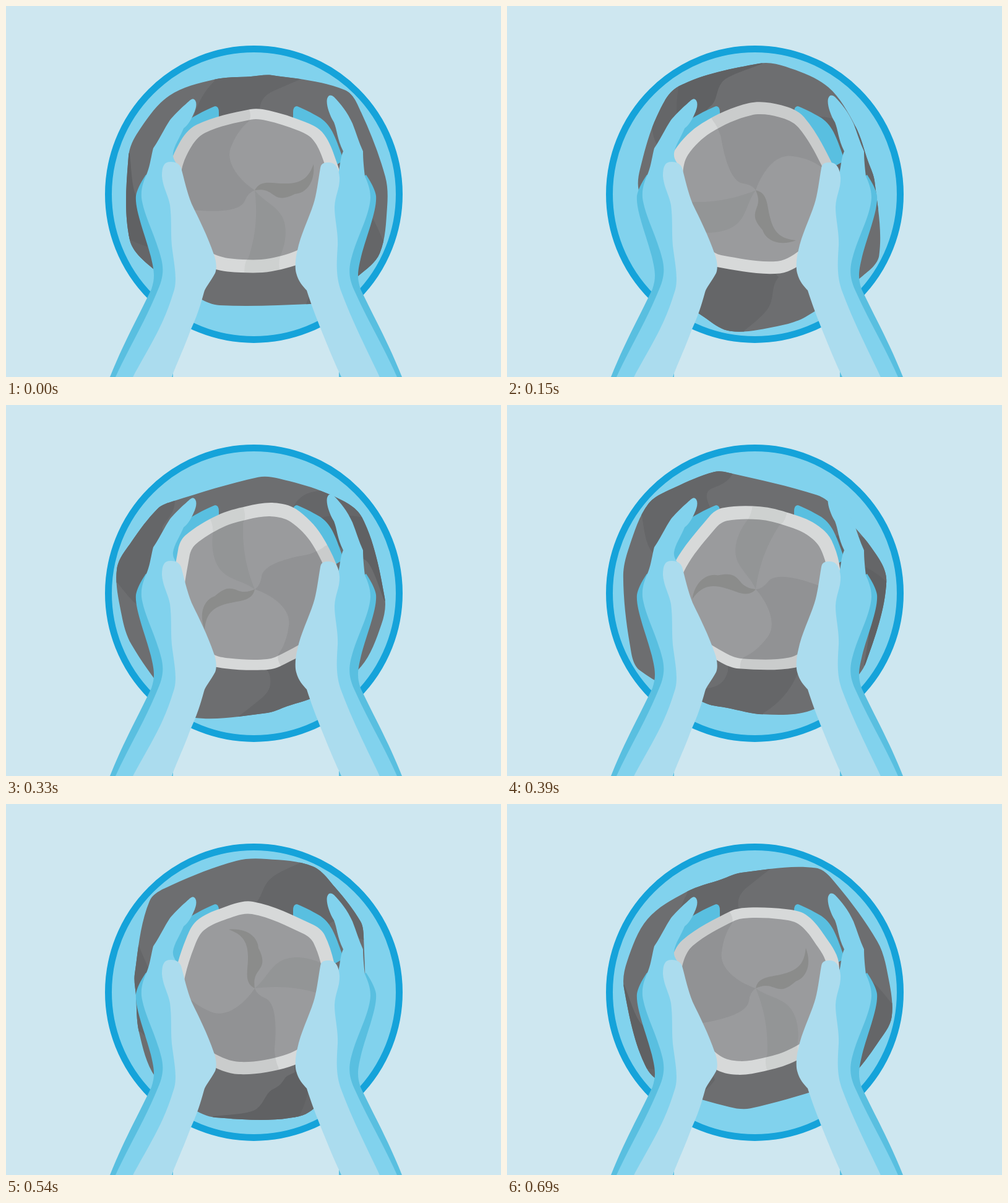
An HTML page for the animation above (720 ms loop, 800 by 600 pixels).

```html
<!DOCTYPE html>
<html lang="en">
<head>
<meta charset="utf-8">
<title>Hands shaping clay on a wheel</title>
<style>
  html, body { margin: 0; width: 100%; height: 100%; overflow: hidden; background: #cee7f0; }
  svg { display: block; width: 100%; height: 100%; }
  .dark { fill: #59bfe0; }
  .mid { fill: #81d2ed; }
  .light { fill: #abdcee; }
</style>
</head>
<body>
<svg viewBox="0 0 800 600">
  <defs>
    <path id="clay"/>
    <path id="ring"/>
    <clipPath id="clayClip"><use href="#clay"/></clipPath>
    <clipPath id="ringClip"><use href="#ring"/></clipPath>
  </defs>

  <circle cx="400.5" cy="304.5" r="235" fill="#81d2ed" stroke="#15a3da" stroke-width="11"/>

  <g id="base">
    <use href="#clay" fill="#6d6e70"/>
    <g clip-path="url(#clayClip)" fill="#656668">
      <path d="M248 436C270 440 285 440 302 424L290 370H180V440Z"/>
      <path fill="#606163" d="M200 238C203 270 204 299 212 309C222 322 235 322 243 334C252 355 262 350 267 362L280 390Q250 402 200 378H150V238Z"/>
      <path d="M609 378C595 345 588 332 575 324C562 316 550 316 540 302L470 340L501 414C510 425 520 435 516 445C510 455 490 460 485 483V520H640V390Z"/>
      <path d="M337 121C318 140 300 170 299 212H420L410 172C410 150 420 142 440 134Q460 125 480 117V90H337Z"/>
    </g>
  </g>

  <!-- far fingers and arm edges, mirrored -->
  <g id="far" class="dark">
    <path d="M168 600C190 545 210 510 235 458C241 440 240 430 234 405C225 370 208 330 210 307Q212 294 226 273L270 300V600Z"/>
    <path d="M262 250C275 215 280 195 300 181C315 172 330 165 338 162Q344 162 344 172V200L300 225L280 260Z"/>
  </g>
  <use href="#far" transform="matrix(-1 0 0 1 808 0)"/>

  <g id="bowl">
    <use href="#ring" fill="#d7d9d9"/>
    <use href="#ring" fill="#9a9b9d" transform="translate(402 296) scale(.857) translate(-402 -298)"/>
    <g clip-path="url(#ringClip)">
      <path opacity=".06" d="M402 298C375 280 352 250 365 225C372 208 382 195 392 187Q399 178 390 160H230V345L275 336Q285 331 303 330C365 336 382 325 386 315Q392 301 402 298Z"/>
      <path opacity=".045" fill="#120" d="M402 298C405 325 407 360 392 407Q383 415 386 440H445Q439 420 443 405C452 385 454 365 450 350C444 325 418 318 402 298Z"/>
    </g>
    <path fill="#8b8c8b" d="M402 298C411 280 430 287 450 287C480 288 490 275 497 256C500 285 485 303 467 304C447 314 440 311 430 304C420 296 410 297 402 298Z"/>
  </g>

  <g class="mid">
    <path d="M177 600C200 550 225 510 246 458C258 430 253 415 247 395C238 365 222 335 219 310C218 295 222 285 226 275C233 260 235 240 238 230C248 215 255 200 264 186C272 175 292 157 298 152Q303 148 306 153Q310 160 303 175C298 187 292 194 287 198C280 215 272 225 270 238Q269 246 275 254L280 300L290 470L205 600Z"/>
    <path d="M632 600C610 550 585 510 562 458C552 435 554 420 562 395C572 365 588 335 589 310C589 295 584 285 580 275C578 260 577 245 577 235C570 220 566 205 560 190C552 172 540 157 530 147Q522 141 519 150C517 158 522 175 530 188C535 200 535 215 545 235C540 245 540 260 537 270L520 300L530 470L604 600Z"/>
  </g>
  <g class="light">
    <path d="M205 600C235 545 255 515 270 465C278 445 272 420 268 388C266 365 268 345 265 322C262 305 254 295 252 275C252 260 255 252 266 252Q279 252 283 262C288 280 292 300 300 320C312 345 325 370 336 402C340 412 341 425 338 432C330 447 322 455 320 463C310 500 303 513 298 525C285 560 275 580 268 600Z"/>
    <path d="M604 600C580 550 560 510 543 465C533 440 534 420 536 388C537 365 531 345 531 325C532 305 540 295 539 277C538 262 532 252 520 253Q509 253 508 262C504 285 502 305 497 320C489 345 476 370 471 395C467 410 467 425 469 432C473 447 480 453 486 460C494 485 502 505 507 518C520 550 530 575 542 600Z"/>
  </g>
</svg>
<script>
  const STEP = 30, TURN = 15, STEPS = 24;
  const byId = id => document.getElementById(id);

  // Corners of the two lumps at rest
  const corners = {
    clay: [
      [198, 243], [214, 203], [264, 145], [336, 119], [396, 114], [430, 112],
      [548, 136], [574, 172], [613, 276], [616, 325], [604, 400], [570, 436],
      [515, 477], [490, 482], [345, 484], [313, 473], [238, 425], [200, 378]
    ],
    ring: [
      [304, 406], [275, 354], [263, 272], [280, 222], [308, 192], [395, 167],
      [425, 169], [482, 187], [511, 204], [531, 243], [542, 295], [505, 392],
      [488, 411], [430, 429], [380, 431], [336, 425]
    ]
  };

  // Closed smooth curve; handles are a third of each chord
  function smooth(pts) {
    const n = pts.length, at = i => pts[(i + n) % n];
    const gap = (a, b) => Math.hypot(b[0] - a[0], b[1] - a[1]);
    const handle = (i, len) => {
      const p = at(i), a = at(i - 1), b = at(i + 1), k = len / 3 / gap(a, b);
      return p.map((v, j) => v + (b[j] - a[j]) * k);
    };
    return pts.reduce((d, p, i) => {
      const len = gap(p, at(i + 1));
      return d + 'C' + [handle(i, len), handle(i + 1, -len), at(i + 1)].join(' ');
    }, 'M' + pts[0]) + 'Z';
  }

  for (const id in corners) byId(id).setAttribute('d', smooth(corners[id]));

  function draw(ms) {
    const angle = Math.floor(ms / STEP) % STEPS * TURN;
    byId('base').setAttribute('transform', `rotate(${angle} 400.5 304.5)`);
    byId('bowl').setAttribute('transform', `rotate(${angle} 402 298)`);
  }

  function loop() {
    draw(performance.now());
    requestAnimationFrame(loop);
  }
  loop();
</script>
</body>
</html>
```
